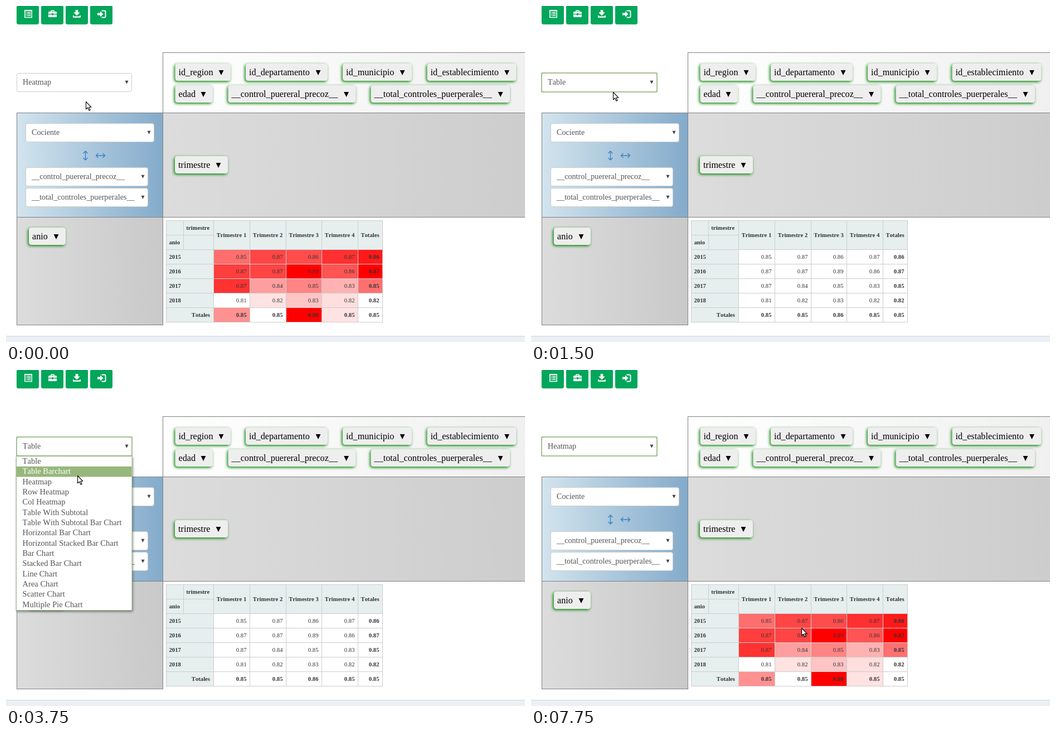
An HTML page that plays this animation: 931 by 602 pixels, repeating every 8000 ms.

```html
<!DOCTYPE html>
<html lang="es">
<head>
<meta charset="utf-8">
<title>Tabla dinámica</title>
<style>
html, body { margin: 0; width: 100%; height: 100%; overflow: hidden; background: #fff; }
svg { display: block; font-family: "Liberation Serif", "Times New Roman", serif; font-kerning: none; }
.cell, .line { shape-rendering: crispEdges; }
.cell { stroke: #cdcdcd; }
.line { stroke: #808080; fill: none; }
.chip { font-size: 16.2px; fill: #000; }
.field { font-size: 14.15px; fill: #555; }
.option { font-size: 14.5px; fill: #555; }
.grid { font-size: 10.67px; fill: #333; }
.bold { font-weight: bold; }
</style>
</head>
<body>
<svg id="stage" width="931" height="602" viewBox="0 0 931 602">
  <defs>
    <linearGradient id="gLight"><stop stop-color="#fff"/><stop offset="1" stop-color="#f0f0f0"/></linearGradient>
    <linearGradient id="gCols"><stop stop-color="#dcdcdc"/><stop offset="1" stop-color="#cdcdcd"/></linearGradient>
    <linearGradient id="gRows"><stop stop-color="#dcdcdc"/><stop offset="1" stop-color="#c9c9c9"/></linearGradient>
    <linearGradient id="gBlue"><stop stop-color="#d2e4ee"/><stop offset="1" stop-color="#84abcb"/></linearGradient>
    <filter id="glow" x="-20%" y="-50%" width="140%" height="200%" color-interpolation-filters="sRGB">
      <feDropShadow dx="-1.6" dy="1.8" stdDeviation="2.4" flood-color="#008000"/>
    </filter>
    <filter id="shade" x="-10%" y="-10%" width="120%" height="120%" color-interpolation-filters="sRGB">
      <feDropShadow dx="1" dy="2" stdDeviation="2" flood-color="#000" flood-opacity=".45"/>
    </filter>
  </defs>
</svg>
<script>
const NS = 'http://www.w3.org/2000/svg';
const stage = document.getElementById('stage');

function add(parent, tag, attrs, text) {
  const el = document.createElementNS(NS, tag);
  for (const key in attrs) el.setAttribute(key, attrs[key]);
  if (text !== undefined) el.textContent = text;
  parent.appendChild(el);
  return el;
}
const rect = (p, x, y, width, height, attrs) => add(p, 'rect', { x, y, width, height, ...attrs });
const path = (p, d, attrs) => add(p, 'path', { d, ...attrs });
const label = (p, x, y, cls, text, attrs) => add(p, 'text', { x, y, class: cls, ...attrs }, text);
const triangle = (p, x, y, half, height, fill) =>
  path(p, `M${x - half} ${y - height / 2}h${2 * half}l${-half} ${height}z`, { fill });
const toggle = (el, on) => el.setAttribute('display', on ? 'inline' : 'none');

function toolbar() {
  for (let i = 0; i < 4; i++)
    rect(stage, 19 + 44 * i, -1, 40, 34, { rx: 3.5, fill: '#00a65a' });
  const line = { fill: 'none', stroke: '#fff', 'stroke-width': 1.4 };
  const solid = { fill: '#fff' };
  path(stage, 'M33.7 7.7h12.6v12.8h-12.6z', line);
  path(stage, 'M35.5 11.5h1.5m1 0h6.5M35.5 14.3h1.5m1 0h6.5M35.5 17.2h1.5m1 0h6.5', line);
  path(stage, 'M33 7h14v2.2h-14z', solid);
  path(stage, 'M77.5 10h12q1.5 0 1.5 1.5v2.6h-6v-1h-3v1h-6v-2.6q0-1.5 1.5-1.5zM76 15.2h6v1.2h3v-1.2h6v3.8q0 1-1 1h-13q-1 0-1-1z', solid);
  path(stage, 'M81 10.5v-2.3h5v2.3', line);
  path(stage, 'M124.7 7h4.6v4.6h3.6l-5.9 5.6-5.9-5.6h3.6zM120 17h2v1.6h10v-1.6h2v3.8h-14z', solid);
  path(stage, 'M164 12.5h5v-3.2l5.5 5.2-5.5 5.2v-3.2h-5z', solid);
  path(stage, 'M171.5 8.5h5q2 0 2 2v8q0 2-2 2h-5', { ...line, 'stroke-width': 2 });
}

function panels() {
  rect(stage, 281, 83, 650, 108, { fill: 'url(#gLight)' });
  rect(stage, 281, 191, 650, 187, { fill: 'url(#gCols)' });
  rect(stage, 19, 191, 262, 187, { fill: 'url(#gBlue)' });
  rect(stage, 19, 378, 262, 194, { fill: 'url(#gRows)' });
  path(stage, 'M931 83.5H281.5V571.5H19.5V191.5H931M19.5 378.5H931', { class: 'line' });
  rect(stage, 0, 591, 931, 11, { fill: '#ecf0f5' });
  rect(stage, 0, 591, 931, 1, { fill: '#d2d6de' });
}

function chip(text, x, y, arrowX) {
  rect(stage, x, y, arrowX + 17 - x, 31, { rx: 4.5, fill: '#eee', filter: 'url(#glow)' });
  label(stage, x + 6, y + 21.3, 'chip', text);
  triangle(stage, arrowX, y + 16.5, 4.4, 8.8, '#000');
}

function select(text, x, y, w) {
  rect(stage, x + .5, y + .5, w - 1, 33, { rx: 3.5, fill: '#fff', stroke: '#ccc' });
  const ring = rect(stage, x, y, w, 34, { rx: 1, fill: 'none', stroke: '#a4c294', 'stroke-width': 2, display: 'none' });
  const value = label(stage, x + 11, y + 21.2, 'field', text);
  triangle(stage, x + w - 9.5, y + 16.7, 3, 6, '#444');
  return { ring, value };
}

const XS = [287.5, 318.5, 372.5, 437.5, 502.5, 566.5, 631.5, 675.5];
const rowY = i => 384.5 + 26 * i;
const rows = [
  ['2015', '0.85 0.87 0.86 0.87 0.86', [110, 70, 77, 48, 26]],
  ['2016', '0.87 0.87 0.89 0.86 0.87', [62, 68, 0, 84, 0]],
  ['2017', '0.87 0.84 0.85 0.83 0.85', [50, 158, 132, 178, 112]],
  ['2018', '0.81 0.82 0.83 0.82 0.82', [255, 226, 196, 222, 255]],
  ['Totales', '0.85 0.85 0.86 0.85 0.85', [145, 255, 0, 226, 255]]
];

function table() {
  const cells = [];
  const box = (a, b, r, n, fill) =>
    rect(stage, XS[a], rowY(r), XS[b] - XS[a], 26 * n, { class: 'cell', fill });
  const head = '#e6eeee';
  for (let i = 0; i < 4; i++) box(i % 2, i % 2 + 1, i >> 1, 1, head);
  label(stage, 323.3, 401, 'grid bold', 'trimestre');
  label(stage, 292.5, 427, 'grid bold', 'anio');
  ['Trimestre 1', 'Trimestre 2', 'Trimestre 3', 'Trimestre 4', 'Totales'].forEach((name, i) => {
    box(i + 2, i + 3, 0, 2, head);
    label(stage, (XS[i + 2] + XS[i + 3]) / 2 - .5, 414, 'grid bold', name, { 'text-anchor': 'middle' });
  });
  rows.forEach(([name, values, tints], r) => {
    const y = rowY(r + 2) + 16.6, last = r === 4;
    box(0, 2, r + 2, 1, head);
    label(stage, last ? 366 : 292.5, y, 'grid bold', name, { 'text-anchor': last ? 'end' : 'start' });
    values.split(' ').forEach((value, c) => {
      cells.push([box(c + 2, c + 3, r + 2, 1, '#fff'), tints[c]]);
      label(stage, XS[c + 3] - 6, y, last || c === 4 ? 'grid bold' : 'grid', value, { 'text-anchor': 'end' });
    });
  });
  return cells;
}

const OPTIONS = ['Table', 'Table Barchart', 'Heatmap', 'Row Heatmap', 'Col Heatmap',
  'Table With Subtotal', 'Table With Subtotal Bar Chart', 'Horizontal Bar Chart',
  'Horizontal Stacked Bar Chart', 'Bar Chart', 'Stacked Bar Chart', 'Line Chart',
  'Area Chart', 'Scatter Chart', 'Multiple Pie Chart'];
const PITCH = 18.33, MENU_TOP = 154.5;

function dropdown() {
  const group = add(stage, 'g', {});
  rect(group, 18.5, 154.5, 207.5, 276, { fill: '#fff', stroke: '#98b880', filter: 'url(#shade)' });
  const bar = rect(group, 19, 0, 206.5, 18.6, { fill: '#97b77c' });
  const items = OPTIONS.map((text, i) => label(group, 29.6, 167.9 + PITCH * i, 'option', text));
  return { group, bar, items };
}

toolbar();
panels();
chip('id_region', 303.5, 103, 386);
chip('id_departamento', 430, 103, 560);
chip('id_municipio', 604, 103, 711);
chip('id_establecimiento', 755.5, 103, 898.5);
chip('edad', 303.5, 142, 354);
chip('__control_puereral_precoz__', 398.5, 142, 610.5);
chip('__total_controles_puerperales__', 654.5, 142, 887);
chip('trimestre', 303, 269, 381);
chip('anio', 41, 397, 90);

const chart = select('Heatmap', 19, 120, 207);
select('Cociente', 35, 210, 231);
select('__control_puereral_precoz__', 35, 289, 220);
select('__total_controles_puerperales__', 35, 326, 220);
path(stage, 'M142.5 260v16M138.5 264l4-4 4 4M138.5 272l4 4 4-4M161.5 268h16M165.5 264l-4 4 4 4M173.5 264l4 4-4 4',
  { fill: 'none', stroke: '#3c85c4', 'stroke-width': 1.5 });

const heat = table();
const menu = dropdown();
const cursor = path(stage, 'M.5 .5V13.8L3.6 11 6 16.2 8.1 15.3 5.8 10.2H9.8Z',
  { fill: '#fff', stroke: '#000', 'stroke-width': 1.1, 'stroke-linejoin': 'round' });

// time, cursor x, cursor y, highlighted option (-1 = menu closed), chart type, focused
const STEPS = [
  [0, 143, 171, -1, 'Heatmap', 0],
  [250, 151, 150, -1, 'Heatmap', 0],
  [500, 152, 144, -1, 'Heatmap', 0],
  [1000, 147, 154, 0, 'Heatmap', 1],
  [1500, 147, 154, -1, 'Table', 1],
  [1750, 147, 147, -1, 'Table', 1],
  [2000, 156, 139, -1, 'Table', 1],
  [2250, 157, 138, -1, 'Table', 1],
  [2750, 157, 138, 0, 'Table', 1],
  [3500, 152, 143, 0, 'Table', 1],
  [3750, 128, 189, 1, 'Table', 1],
  [4000, 92, 193, 2, 'Table', 1],
  [4250, 63, 202, 2, 'Table', 1],
  [4500, 76, 206, 2, 'Table', 1],
  [4750, 109, 200, 2, 'Table', 1],
  [5000, 121, 199, 2, 'Table', 1],
  [6000, 121, 199, -1, 'Heatmap', 1],
  [7000, 650, 488, -1, 'Heatmap', 1],
  [7250, 657, 468, -1, 'Heatmap', 1],
  [7500, 567, 440, -1, 'Heatmap', 1],
  [7750, 485, 462, -1, 'Heatmap', 1]
];
const LOOP = 8000;
let shown;

function show([, x, y, option, type, focused]) {
  cursor.setAttribute('transform', `translate(${x} ${y})`);
  chart.value.textContent = type;
  toggle(chart.ring, focused);
  toggle(menu.group, option >= 0);
  menu.bar.setAttribute('y', MENU_TOP + PITCH * option);
  menu.items.forEach((item, i) => { item.style.fill = i === option ? '#fff' : ''; });
  heat.forEach(([cell, tint]) => {
    cell.setAttribute('fill', type === 'Heatmap' ? `rgb(255,${tint},${tint})` : '#fff');
  });
}

const start = performance.now();
function tick() {
  const t = (performance.now() - start) % LOOP;
  const step = STEPS.findLast(s => s[0] <= t) || STEPS[0];
  if (step !== shown) show(shown = step);
  requestAnimationFrame(tick);
}
tick();
</script>
</body>
</html>
```
